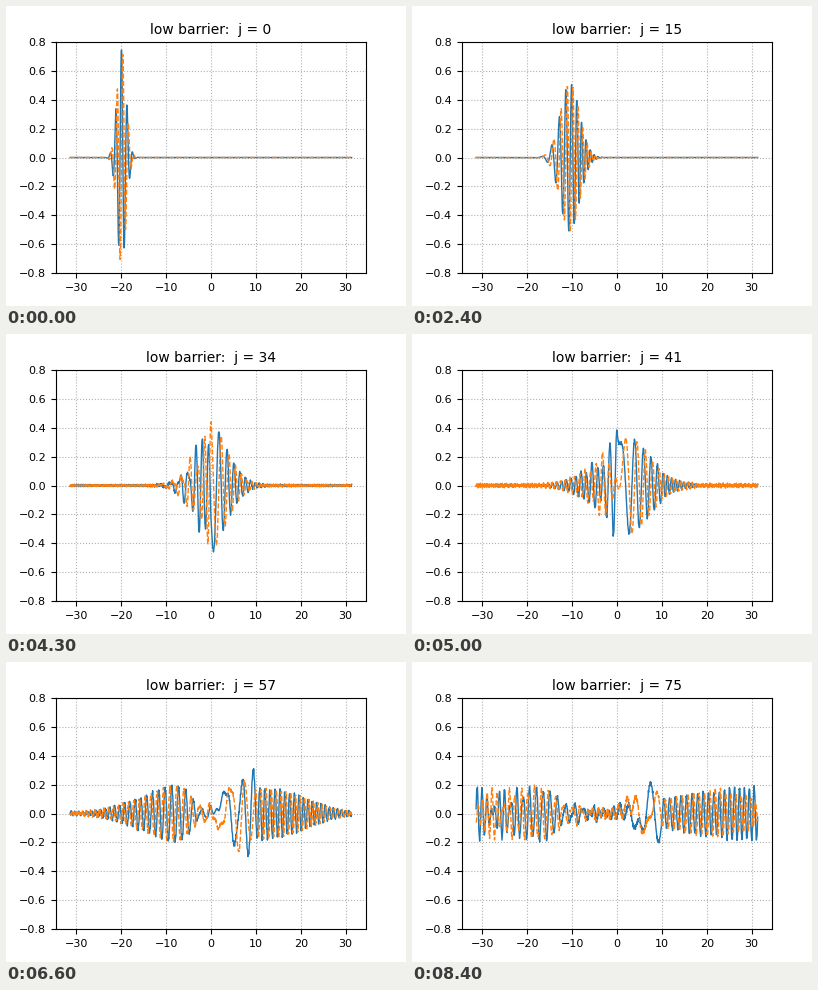
A matplotlib script that plays this animation: 400x300 px, repeating every 9.4 s.

```python
import numpy as np
import matplotlib.pyplot as plt
from matplotlib.animation import FuncAnimation

N = 1024
HALF = 10 * np.pi          # half width of the periodic box
DT = np.pi / 250
SUBSTEPS = 10              # time steps between two pictures
LAST = 75                  # final picture index
HOLD = 9                   # extra frames at the start and at the end

x = -HALF + 2 * HALF * np.arange(N) / N
k = 2 * np.pi * np.fft.fftfreq(N, 2 * HALF / N)
barrier = np.where((x > 0) & (x < 10), 10.0, 0.0)
kinetic = np.exp(-0.5j * k**2 * DT)
half_kick = np.exp(-0.5j * barrier * DT)


def step(psi):
    """Advance the wave by one split-operator step."""
    psi = np.fft.ifft(kinetic * np.fft.fft(half_kick * psi))
    return half_kick * psi


def evolve():
    """Return the wave at every picture index."""
    d = x + 20
    psi = step(np.pi**-0.25 * np.exp(-d**2 / 2 + 5j * d))
    states = [psi]
    for _ in range(LAST):
        for _ in range(SUBSTEPS):
            psi = step(psi)
        states.append(psi)
    return states


states = evolve()

plt.rcParams["font.family"] = "DejaVu Sans"
fig, ax = plt.subplots(figsize=(4, 3), dpi=100)
fig.subplots_adjust(left=0.125, right=0.9, bottom=0.11, top=0.88)
ax.set_xlim(-1.1 * HALF, 1.1 * HALF)
ax.set_ylim(-0.8, 0.8)
ax.set_xticks(range(-30, 31, 10))
ax.set_yticks(np.arange(-4, 5) * 0.2)
ax.tick_params(labelsize=8)
ax.grid(linestyle=":")
real_line, = ax.plot(x, states[0].real, "-", color="C0", lw=1)
imag_line, = ax.plot(x, states[0].imag, "--", color="C1", lw=1)
title = ax.set_title("", fontsize=10)


def update(n):
    j = min(max(n - HOLD, 0), LAST)
    real_line.set_ydata(states[j].real)
    imag_line.set_ydata(states[j].imag)
    title.set_text(f"low barrier:  j = {j}")
    return real_line, imag_line, title


anim = FuncAnimation(fig, update, frames=LAST + 1 + 2 * HOLD, interval=100,
                     repeat=True, repeat_delay=0, blit=False)
plt.show()
```
